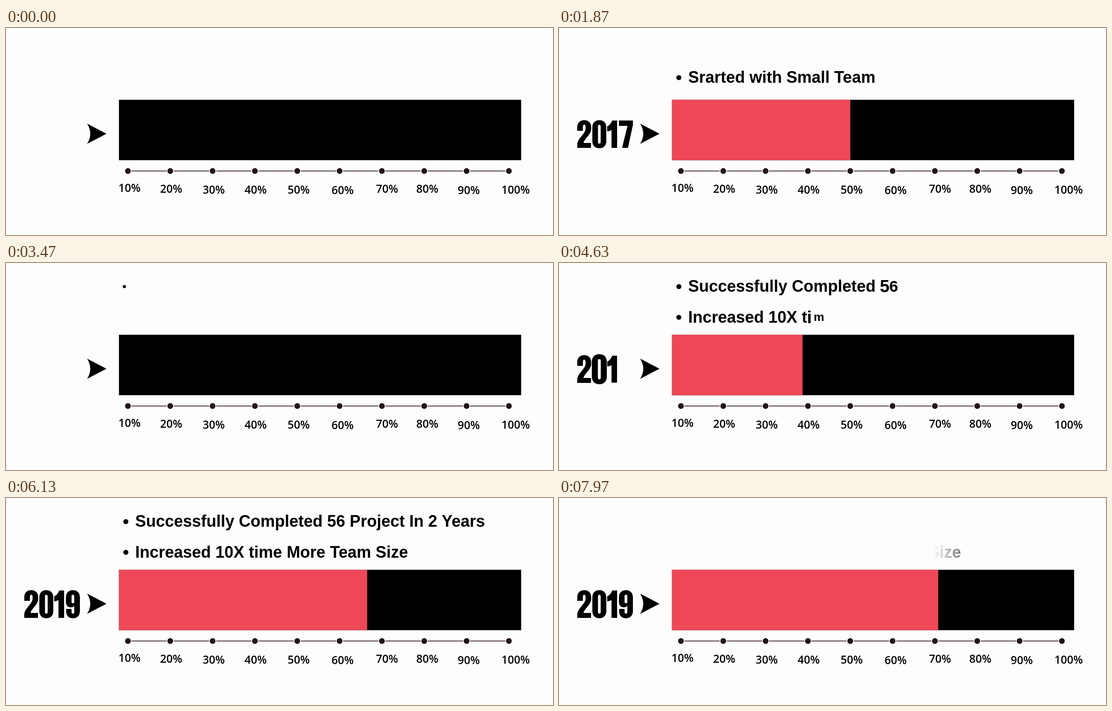
An HTML page with a canvas that plays this animation: 1214x461 px, repeating every 8 s.

```html
<!DOCTYPE html>
<html lang="en">
<head>
<meta charset="utf-8">
<title>Team growth timeline</title>
<style>
html, body { margin: 0; width: 100%; height: 100%; overflow: hidden; background: #fdfdfd; }
canvas { display: block; }
</style>
</head>
<body>
<canvas id="stage" width="1214" height="461"></canvas>
<script>
const ctx = document.getElementById('stage').getContext('2d');
const LOOP = 8000, CUT = 3300;
const TEXT_FONT = 'bold 36px "Liberation Sans", Arial, sans-serif';
const LABEL_FONT = '600 24.5px "Open Sans", "Noto Sans", sans-serif';
const TEXT_X = 286.7, FADE = 120, WIPE_FROM = 138, WIPE_SPEED = 0.95;
const POP_STEPS = 2.7; // a letter's pop lasts this many letter steps

const scenes = [
  {
    lines: [{ text: 'Srarted with Small Team', y: 122, start: 30, step: 37, out: 2400 }],
    year: { text: '2017', start: 150, step: 142 },
    bar: { start: 458, time: 1715, width: 398 }
  },
  {
    lines: [
      { text: 'Successfully Completed 56 Project In 2 Years', y: 64, start: 3450, step: 45.5, out: 6717 },
      { text: 'Increased 10X time More Team Size', y: 132.5, start: 3570, step: 60.4, out: 7242 }
    ],
    year: { text: '2019', start: 4211, step: 142 },
    bar: { start: 3859, time: 3836, width: 591 }
  }
];

// Heavy condensed numerals in a 31 x 61 box
const numerals = {
  0: new Path2D('M0 15.5C0 5 6-.8 15.5-.8S31 5 31 15.5V45.5C31 56 25 61.8 15.5 61.8S0 56 0 45.5Z' +
    'M12.5 14V47C12.5 50 13 51.5 15.5 51.5S18.5 50 18.5 47V14C18.5 11 18 9.5 15.5 9.5S12.5 11 12.5 14Z'),
  1: new Path2D('M9.5 61V21C7 23 4 24 0 24V13C5 11 9 6 11 0H22V61Z'),
  2: new Path2D('M0 23V15.5C0 5 6-.8 15.5-.8S31 5 31 15.5V18C31 32 15 41 14 50H30.5V61H0V54' +
    'C0 40 18.5 30 18.5 18V15.5C18.5 12 18 9.5 15.5 9.5S12.5 12 12.5 15.5V23Z'),
  7: new Path2D('M0 0H31V10L20 61H7L19 12H0Z'),
  9: new Path2D('M0 15.5C0 5 6-.8 15.5-.8S31 5 31 15.5V45.5C31 56 25 61.8 15.5 61.8S.5 56 .5 45.5V41H12.5V47' +
    'C12.5 50 13 51.5 15.5 51.5S18.5 50 18.5 47V34C16.5 36.5 14 37.5 11 37.5C4 37.5 0 33 0 25Z' +
    'M12.5 14V25C12.5 27.5 13.5 28.5 15.5 28.5S18.5 27.5 18.5 25V14C18.5 11 18 9.5 15.5 9.5S12.5 11 12.5 14Z')
};
const yearX = [40.5, 74, 107, 133];
const arrow = new Path2D('M180 213L223 235.5L180 258Q194 235.5 180 213Z');
const labelX = [274, 366.5, 461, 554, 649.5, 747, 845.5, 935, 1027, 1131];
const labelY = [365, 367, 369, 369, 369, 370, 367, 367, 370, 369];

const clamp = u => Math.max(0, Math.min(1, u));
const easeOut = u => 1 - (1 - clamp(u)) ** 3;

function pop(t, item, index) {
  const u = clamp((t - item.start - index * item.step) / (item.step * POP_STEPS));
  return u ? Math.max(0, 1 + 2.7 * (u - 1) ** 3 + 1.7 * (u - 1) ** 2) : 0;
}

function scaled(s, x, y, draw) {
  if (!s) return;
  ctx.save();
  ctx.translate(x, y);
  ctx.scale(s, s);
  ctx.translate(-x, -y);
  draw();
  ctx.restore();
}

function dot(x, y, r) {
  ctx.beginPath();
  ctx.arc(x, y, r, 0, 7);
  ctx.fill();
}

function drawLine(line, t) {
  const { text, y } = line, mid = y - 11.5;
  const edge = WIPE_FROM + Math.max(0, t - line.out) * WIPE_SPEED;
  const ink = ctx.createLinearGradient(edge, 0, edge + FADE, 0);
  ink.addColorStop(0, 'rgba(0,0,0,0)');
  ink.addColorStop(1, '#000');
  ctx.fillStyle = ink;
  ctx.font = TEXT_FONT;
  ctx.textAlign = 'left';
  scaled(pop(t, line, 0), 257, mid, () => dot(266, mid, 5.6));
  [...text].forEach((ch, i) => {
    const w = ctx.measureText(ch).width;
    const x = TEXT_X + ctx.measureText(text.slice(0, i + 1)).width - w;
    scaled(pop(t, line, i + 1), x + w / 2, mid, () => ctx.fillText(ch, x, y));
  });
}

function drawYear(year, t) {
  ctx.fillStyle = '#000';
  [...year.text].forEach((ch, i) => {
    const x = yearX[i];
    scaled(pop(t, year, i), x + (ch === '1' ? 11 : 15.5), 236.5, () => {
      ctx.translate(x, 206);
      ctx.fill(numerals[ch], 'evenodd');
    });
  });
}

function drawBar(bar, t) {
  ctx.fillStyle = '#000';
  ctx.fillRect(250.7, 159.8, 892.6, 134.6);
  ctx.fillStyle = '#ee4857';
  ctx.fillRect(250.7, 159.8, bar.width * easeOut((t - bar.start) / bar.time), 134.6);
}

function drawScale() {
  ctx.font = LABEL_FONT;
  ctx.textAlign = 'center';
  labelX.forEach((lx, i) => {
    const x = 270.6 + i * 93.95;
    ctx.fillStyle = '#22121a';
    dot(x, 318.5, 6.4);
    if (i < 9) {
      ctx.fillStyle = '#3a2222';
      ctx.fillRect(x + 8, 317.6, 78, 1.8);
    }
    ctx.fillStyle = '#000';
    ctx.fillText((i + 1) * 10 + '%', lx, labelY[i]);
  });
}

function frame(now) {
  const t = now % LOOP;
  const scene = scenes[t < CUT ? 0 : 1];
  ctx.fillStyle = '#fdfdfd';
  ctx.fillRect(0, 0, 1214, 461);
  drawBar(scene.bar, t);
  drawScale();
  ctx.fill(arrow);
  drawYear(scene.year, t);
  scene.lines.forEach(line => drawLine(line, t));
}

const began = performance.now();
function tick() {
  frame(performance.now() - began);
  requestAnimationFrame(tick);
}
tick();
</script>
</body>
</html>
```
